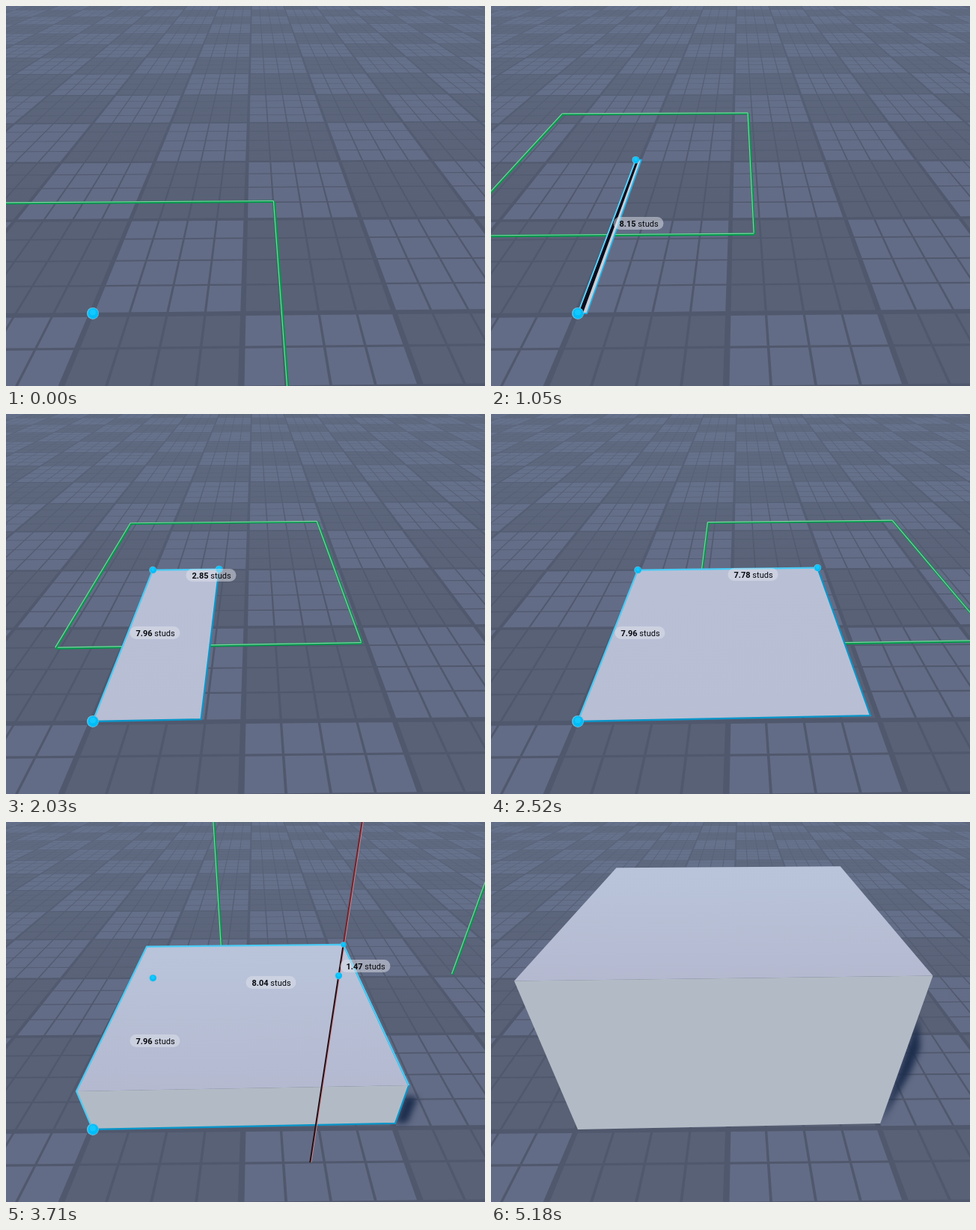
Write an HTML page with a canvas that moves like this. It is 640x508 px and loops after 5.25 s.

```html
<!DOCTYPE html>
<html lang="en">
<head>
<meta charset="utf-8">
<title>Drawing a block on a grid</title>
<style>
html, body { margin: 0; width: 100%; height: 100%; overflow: hidden; background: #596178; }
canvas { display: block; }
</style>
</head>
<body>
<canvas id="stage" width="640" height="508"></canvas>
<script>
const LOOP = 5250, STEP = 70;
const W = 640, H = 508;
const canvas = document.getElementById('stage');
const ctx = canvas.getContext('2d');

// Floor units are tiles of 4 studs: x to the right, d away from the eye, h upwards.
function project([x, d, h = 0]) {
  const q = d - 0.773 * h;
  return [(331 * d + 636.5 * x - 44.6 - 259 * h) / q, (1640.6 - 111 * d - 713 * h) / q];
}
const SKEW = 0.011, TURN = 0.0135, REACH = 1.25;
const A = [-0.9916, 3.143], B = [-1.017, 5.133];
const TURNED_AT = 1610, WIDTH_AT = 1750, HEIGHT_AT = 3220, DONE_AT = 5110, PLAIN_AT = 5180;

const cursorKeys = [
  [0, ...A], [70, -1, 3.3], [350, -1.2, 5], [490, -1.256, 5.243], [700, -1.25, 5.3],
  [1050, -1.05, 5.18], [1400, -1, 5.16], [1610, ...B]
];
const widthKeys = [
  [1680, 0], [1820, 0.06], [2030, 0.7125], [2240, 1.63], [2450, 1.93],
  [2800, 2], [3080, 2.0025], [3220, 2.01]
];
const heightKeys = [
  [3220, 0], [3430, 0.06], [3920, 0.6], [4340, 0.8925], [4480, 0.935], [4970, 1.137]
];

function at(keys, t) {
  const i = keys.findIndex(k => k[0] > t);
  if (i === 0) return keys[0].slice(1);
  if (i < 0) return keys[keys.length - 1].slice(1);
  const a = keys[i - 1], b = keys[i], p = (t - a[0]) / (b[0] - a[0]);
  return a.slice(1).map((v, n) => v + (b[n + 1] - v) * p);
}
const mix = (a, b, p) => a.map((v, i) => v + (b[i] - v) * p);
const raise = (p, h) => [p[0], p[1], h];
const along = (p, n, turn = TURN) => [p[0] + n, p[1] + n * (SKEW + turn)];
const away = (p, n, turn = TURN) => [p[0] - n * turn, p[1] + n];

function trace(c, points, close) {
  c.beginPath();
  points.forEach(p => c.lineTo(...p));
  if (close) c.closePath();
}
function fill(points, color, c = ctx) {
  trace(c, points, true);
  c.fillStyle = color;
  c.fill();
}
function stroke(points, color, width, close) {
  trace(ctx, points, close);
  ctx.strokeStyle = color;
  ctx.lineWidth = width;
  ctx.stroke();
}

function makeFloor() {
  const floor = document.createElement('canvas');
  floor.width = W;
  floor.height = H;
  const c = floor.getContext('2d');
  c.fillStyle = '#50586d';
  c.fillRect(0, 0, W, H);
  const spot = (x, z) => project([x, A[1] + z + SKEW * x]);
  const edge = i => i % 4 ? 0.008 : 0.018;
  for (let i = -36; i < 36; i++) {
    for (let j = -4; j < 52; j++) {
      const light = (Math.floor(i / 4) + Math.floor(j / 4)) & 1;
      const x0 = i / 4 + edge(i), x1 = (i + 1) / 4 - edge(i + 1);
      const z0 = j / 4 + edge(j), z1 = (j + 1) / 4 - edge(j + 1);
      fill([spot(x0, z0), spot(x1, z0), spot(x1, z1), spot(x0, z1)], light ? '#636c86' : '#596176', c);
    }
  }
  const haze = c.createLinearGradient(0, 0, 0, 260);
  haze.addColorStop(0, 'rgba(112,130,156,.3)');
  haze.addColorStop(1, 'rgba(100,120,146,0)');
  c.fillStyle = haze;
  c.fillRect(0, 0, W, 260);
  return floor;
}
const floor = makeFloor();

function greenEdge(a, b) {
  const width = 2 + 12 / (a[1] + b[1]);
  const p = project(a), q = project(b);
  stroke([p, q], '#00994a', width);
  stroke([p, q].map(([x, y]) => [x - 0.8, y - 0.8]), '#86cfa6', 1.2);
}

function floorSquare(center, turn) {
  const corner = (x, z) => away(along(center, x * REACH, turn), z * REACH, turn);
  const c = [corner(-1, 1), corner(1, 1), corner(1, -1), corner(-1, -1)];
  c.forEach((p, i) => greenEdge(p, c[(i + 1) % 4]));
}

// Upright square; the part under the floor is hidden.
function wallSquare(center, h) {
  const l = along(center, -REACH), r = along(center, REACH);
  const low = Math.max(0, h - REACH), top = h + REACH;
  greenEdge(raise(l, low), raise(l, top));
  greenEdge(raise(r, low), raise(r, top));
  greenEdge(raise(l, top), raise(r, top));
}

function dot(p) {
  const [x, y] = project(p), r = 25 / (p[1] - 0.773 * (p[2] || 0)) - (p[2] ? 1.4 : 0);
  const disc = (dx, dy, s, color) => {
    ctx.beginPath();
    ctx.arc(x + dx, y + dy, r * s, 0, 7);
    ctx.fillStyle = color;
    ctx.fill();
  };
  disc(0, 0, 1, '#64bfe2');
  disc(0.4, 0, 0.87, '#00bdf8');
  disc(0, -r * 0.2, 0.5, '#12c9ff');
}

function label(a, b, tiles) {
  const [x, y] = project(mix(a, b, 0.5));
  const left = Math.round(x) - 0.5, top = Math.round(y) - 1;
  const value = (tiles * 4).toFixed(2);
  ctx.fillStyle = 'rgba(225,228,235,.5)';
  ctx.beginPath();
  ctx.roundRect(left, top, 67, 17, 8.5);
  ctx.fill();
  ctx.fillStyle = '#080a0e';
  ctx.font = 'bold 11px Roboto, sans-serif';
  ctx.fillText(value, left + 8, top + 12.5);
  const w = ctx.measureText(value + ' ').width;
  ctx.font = '11px Roboto, sans-serif';
  ctx.fillText('studs', left + 8 + w, top + 12.5);
}

function rod(end, dark) {
  const p = [A, end, along(end, 0.06), along(A, 0.06)].map(project);
  fill(p, dark ? '#c9ccd4' : '#b9c0d6');
  if (dark) fill([p[0], p[1], mix(p[1], p[2], 0.55), mix(p[0], p[3], 0.55)], '#060d1c');
  else stroke([mix(p[0], p[3], 0.78), mix(p[1], p[2], 0.78)], '#dde3ee', 1.2);
  stroke(p, '#1cb4ec', 1.8, true);
  stroke([p[0], p[1]], '#62d4fa', 1.6);
}

function block(width, h, outlined) {
  const base = [A, B, along(B, width), along(A, width)];
  const [a, b, c, d] = base.map(project);
  const [ta, tb, tc, td] = base.map(p => project(raise(p, h)));
  if (h > 0.1) {
    ctx.save();
    ctx.filter = 'blur(4px)';
    const [ex, ey] = mix(d, td, 0.45);
    fill([d, mix(d, td, 0.3), mix(d, td, 0.72), [ex + 22, ey - 12], [ex + 8, ey + 22]], '#1c2d4c');
    ctx.restore();
  }
  const shade = ctx.createLinearGradient(0, tb[1], 0, ta[1]);
  shade.addColorStop(0, h ? '#b9c4da' : '#b9c0d6');
  shade.addColorStop(1, h ? '#b4b9d0' : '#b8bed4');
  fill([ta, tb, tc, td], shade);
  if (h) fill([ta, td, d, a], '#b2bbc5');
  if (!outlined) return;
  stroke([tc, td, d, a], '#0a95c8', 2.3);
  stroke(h ? [a, ta, tb, tc, td] : [a, tb, tc], '#4bcbf5', 2.2);
}

function guide(p, h) {
  const top = project(raise(p, 3)), end = project(raise(p, 1.35 * h - 4.08));
  const low = project(raise(p, h));
  stroke([top, end].map(([x, y]) => [x + 1.2, y]), '#d98086', 1.6);
  stroke([top, low], '#6a2630', 2);
  stroke([low, end], '#1c1219', 2);
}

function draw(t) {
  const cursor = at(cursorKeys, t);
  const [width] = at(widthKeys, t);
  const [h] = at(heightKeys, t);
  const C = along(B, width), top = raise(C, h);
  const lifting = t >= HEIGHT_AT, active = t < DONE_AT;

  ctx.drawImage(floor, 0, 0);
  ctx.lineJoin = 'round';

  if (t < WIDTH_AT) {
    floorSquare(cursor, t < TURNED_AT ? 0 : TURN);
    if (t > 0) rod(cursor, t < TURNED_AT);
    dot(A);
    if (t > 0) {
      dot(cursor);
      label(A, cursor, Math.hypot(cursor[0] - A[0], cursor[1] - A[1]));
    }
    return;
  }

  if (active) {
    // The first sideways pull briefly stands the square upright.
    if (lifting || t < WIDTH_AT + STEP) wallSquare(C, h);
    else floorSquare(C, TURN);
  }
  block(Math.max(width, 0.06), h, t < PLAIN_AT);
  if (!active) return;
  if (lifting) guide(C, h);
  [A, B, C].forEach(dot);
  if (h) dot(top);
  label(A, B, 1.99);
  label(B, C, width);
  if (h) label(raise(C, 0), top, h);
}

const start = performance.now();
function frame() {
  const t = (performance.now() - start) % LOOP;
  draw(Math.floor(t / STEP) * STEP);
  requestAnimationFrame(frame);
}
frame();
</script>
</body>
</html>
```
